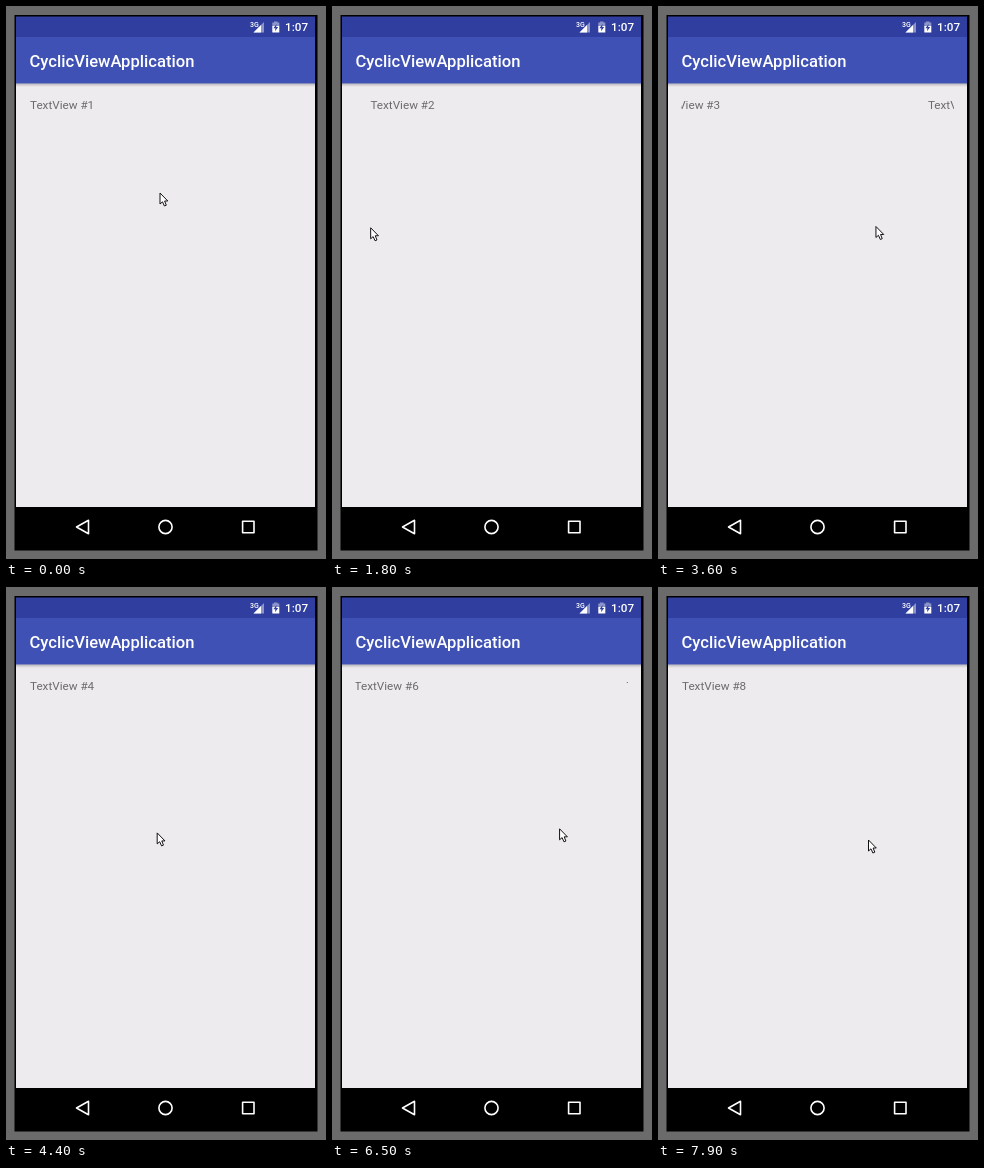
An HTML page with a canvas that plays this animation: 320 by 553 pixels, repeating every 8000 ms.

```html
<!DOCTYPE html>
<html lang="en">
<head>
<meta charset="utf-8">
<title>Cyclic view</title>
<style>
html, body { margin: 0; width: 100%; height: 100%; overflow: hidden; background: #6b6b6b; }
canvas { display: block; width: 320px; height: 553px; }
</style>
</head>
<body>
<canvas id="stage"></canvas>
<script>
const LOOP = 8000, STEP = 100;
const LEFT = 24, PAGE = 272;
const DRAG = 400, SETTLE = 300, SLOP = 8;
const BLUE = '#3f51b5', DARK = '#303f9f', DIM = '#8c95ca', WHITE = '#fff';

const canvas = document.getElementById('stage');
const ctx = canvas.getContext('2d');
const dpr = window.devicePixelRatio || 1;
canvas.width = 320 * dpr;
canvas.height = 553 * dpr;
ctx.scale(dpr, dpr);

// Each swipe drags the pointer from one point to another
const swipes = [
  { at: 1300, from: [235, 212], to: [28, 222] },
  { at: 2400, from: [220.5, 218], to: [22, 224] },
  { at: 3500, from: [252, 215], to: [34, 250] },
  { at: 4800, from: [235, 243], to: [47, 252] },
  { at: 5700, from: [227, 244], to: [20, 261] },
  { at: 6450, from: [237, 241], to: [18, 260] },
  { at: 7200, from: [226, 247], to: [26, 259] }
];
const entry = [154, 187], exit = { at: 7900, from: [210.5, 253] };

const clamp = k => Math.min(1, Math.max(0, k));
const smooth = k => k * k * (3 - 2 * k);
const easeOut = k => 1 - Math.pow(1 - k, 4);

function glide(a, b, k) {
  const e = smooth(clamp(k));
  return a.map((v, i) => v + (b[i] - v) * e);
}

function pointerAt(t) {
  const i = swipes.findLastIndex(s => t >= s.at);
  const next = swipes[i + 1] || exit;
  if (i < 0) return glide(entry, next.from, t / next.at);
  const { at, from, to } = swipes[i];
  const release = at + DRAG;
  return t < release
    ? glide(from, to, (t - at) / DRAG)
    : glide(to, next.from, (t - release) / (next.at - release));
}

// The page follows the pointer, then snaps to the next one
function scrollAt(t) {
  let pos = 0;
  for (const { at, from, to } of swipes) {
    if (t < at) break;
    const x = glide(from, to, (t - at) / DRAG)[0];
    const drag = Math.max(0, from[0] - SLOP - x);
    pos += drag + (PAGE - drag) * easeOut(clamp((t - at - DRAG) / SETTLE));
  }
  return pos;
}

function rect(color, x, y, w, h) {
  ctx.fillStyle = color;
  ctx.fillRect(x, y, w, h);
}

function text(str, x, y, size, color, weight = 400) {
  ctx.font = `${weight} ${size}px Roboto, sans-serif`;
  ctx.fillStyle = color;
  ctx.fillText(str, x, y);
}

function poly(points, fill, stroke) {
  ctx.beginPath();
  points.forEach(([x, y]) => ctx.lineTo(x, y));
  ctx.closePath();
  if (fill) {
    ctx.fillStyle = fill;
    ctx.fill();
  }
  if (stroke) {
    ctx.strokeStyle = stroke;
    ctx.stroke();
  }
}

function drawStatus() {
  text('3G', 244, 20.5, 7, WHITE, 500);
  poly([[258, 16], [258, 26.5], [247.5, 26.5]], DIM);
  poly([[255, 19], [255, 26.5], [247.5, 26.5]], WHITE);
  rect(DIM, 268, 15.5, 3.5, 1.5);
  rect(DIM, 266.3, 16.5, 7, 3.5);
  rect(WHITE, 266.3, 20, 7, 6.5);
  poly([[270.6, 18], [267.4, 22.3], [269.4, 22.3], [269, 25.3], [272.2, 21], [270.2, 21]], DARK);
  text('1:07', 279, 25.3, 11.7, WHITE, 500);
}

function drawNav() {
  ctx.lineWidth = 1.6;
  ctx.lineJoin = 'round';
  poly([[70.5, 521], [82.5, 514.3], [82.5, 527.7]], null, WHITE);
  ctx.beginPath();
  ctx.arc(159.5, 521, 6.6, 0, Math.PI * 2);
  ctx.stroke();
  ctx.strokeRect(236.6, 515.3, 11.4, 11.4);
}

function drawPages(pos) {
  ctx.save();
  ctx.beginPath();
  ctx.rect(LEFT - 0.5, 88, PAGE + 0.5, 24);
  ctx.clip();
  const first = Math.floor(pos / PAGE);
  for (let n = first; n < first + 2; n++) {
    text('TextView #' + (n + 1), LEFT + n * PAGE - pos, 103, 11.7, '#6c6a6c');
  }
  ctx.restore();
}

function drawPointer([x, y]) {
  ctx.save();
  ctx.translate(x, y);
  ctx.lineWidth = 1;
  ctx.lineJoin = 'miter';
  poly([[0, 0], [0, 11], [2.5, 8.8], [4.4, 13], [6.3, 12.2], [4.6, 8], [7.8, 8]], WHITE, '#111');
  ctx.restore();
}

function draw(t) {
  rect('#6b6b6b', 0, 0, 320, 553);
  rect('#000', 8.5, 9, 303, 535.5);
  rect('#eeebee', 10, 77, 299, 424);
  rect(DARK, 10, 10.5, 299, 21);
  rect(BLUE, 10, 31, 299, 46.5);
  const shade = ctx.createLinearGradient(0, 77.5, 0, 81);
  shade.addColorStop(0, 'rgba(0,0,0,.22)');
  shade.addColorStop(1, 'rgba(0,0,0,0)');
  rect(shade, 10, 77.5, 299, 3.5);
  drawStatus();
  text('CyclicViewApplication', 23.5, 61, 16.6, WHITE, 500);
  drawPages(scrollAt(t));
  drawNav();
  drawPointer(pointerAt(t));
}

const began = performance.now();
function frame() {
  const t = (performance.now() - began) % LOOP;
  draw(Math.floor(t / STEP) * STEP);
  requestAnimationFrame(frame);
}
frame();
</script>
</body>
</html>
```
